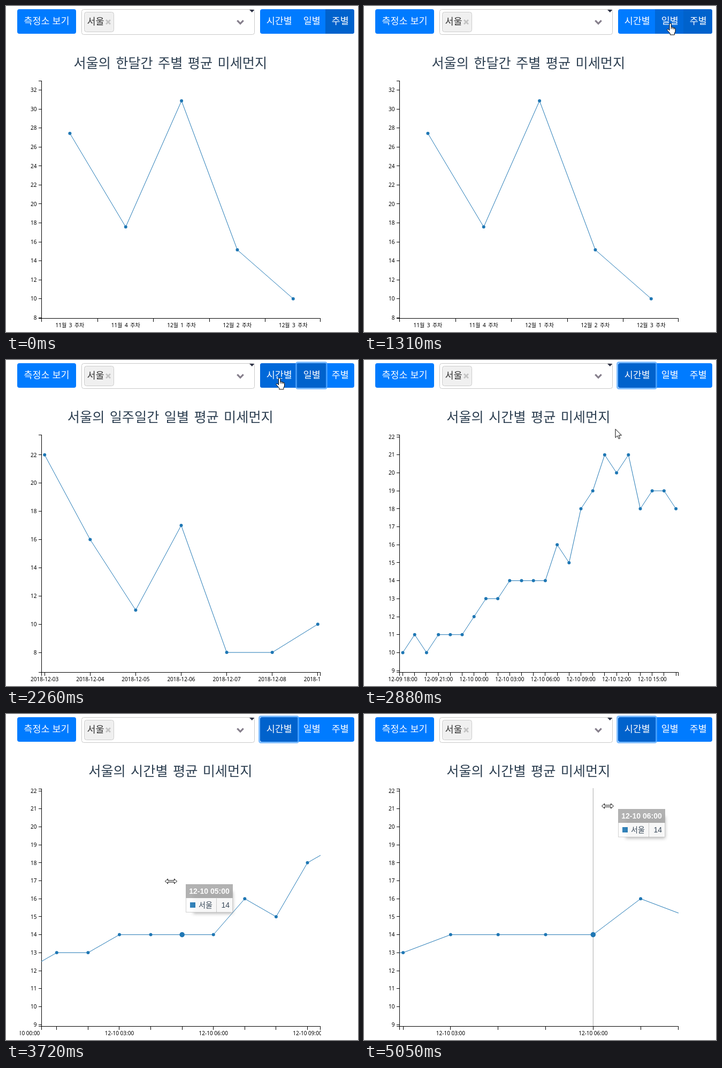
An HTML page for the animation above (5.13 s loop, 658x611 px).

```html
<!DOCTYPE html>
<html lang="ko">
<head>
<meta charset="utf-8">
<style>
  html, body { margin: 0; width: 100%; height: 100%; overflow: hidden; background: #fff; }
  svg { display: block; }
  text { font-family: 'Noto Sans CJK KR', 'Noto Sans CJK', 'Noto Sans', sans-serif; }
  .title { font-size: 25.2px; font-weight: 300; word-spacing: 2.3px; fill: #2c3e50; text-anchor: middle; }
  .ui { font-size: 17.4px; text-anchor: middle; fill: #fff; }
  .axis text { font: 10px 'Noto Sans', 'Noto Sans CJK KR', sans-serif; text-anchor: middle; }
  .axis .y { text-anchor: end; }
  .axis .week { word-spacing: 1.9px; }
  .axis path { fill: none; stroke: #000; shape-rendering: crispEdges; }
  .data { fill: #1f77b4; }
  .data path { fill: none; stroke: #1f77b4; }
  .tip text { font: 14px 'Liberation Sans', 'Noto Sans CJK KR', sans-serif; fill: #2c3e50; }
  .tip .head { font-weight: bold; fill: #fff; text-anchor: middle; }
  .cursor { fill: #fff; stroke: #000; stroke-linejoin: round; }
</style>
</head>
<body>
<svg width="658" height="611" viewBox="0 0 658 611">
  <defs>
    <clipPath id="plot"><rect x="66" y="136" width="522" height="452"/></clipPath>
    <clipPath id="labels"><rect x="26" y="580" width="563" height="31"/></clipPath>
    <clipPath id="group"><rect x="475" y="6" width="176" height="46" rx="4"/></clipPath>
    <filter id="blur" x="-50%" y="-50%" width="200%" height="200%"><feGaussianBlur stdDeviation="3"/></filter>
  </defs>
  <rect x="21" y="6" width="110" height="46" rx="4" fill="#007bff"/>
  <text class="ui" x="76" y="34.3">측정소 보기</text>
  <rect x="141.5" y="6.5" width="323" height="47" rx="4" fill="#fff" stroke="#c8c8c8"/>
  <rect x="146.5" y="11.5" width="55" height="37" rx="4" fill="#f0f0f0" stroke="#ccc"/>
  <text class="ui" x="167.5" y="35.3" style="fill:#333">서울</text>
  <path d="M187 26l8 8m0-8l-8 8" stroke="#c3c3c3" stroke-width="2.8"/>
  <path d="M432.3 27.2l5.7 5.8 5.7-5.8" fill="none" stroke="#857e8b" stroke-width="3.2"/>
  <path d="M455 7h9.5l-4.7 5z" fill="#303548"/>
  <g id="scene"></g>
</svg>
<script>
const LOOP = 5130;
const scene = document.getElementById('scene');
const LEFT = 66.5, RIGHT = 587.5, TOP = 140.5, BOTTOM = 585.5;
const ZOOM_X = 309.1;

const pad = n => String(n).padStart(2, '0');
const hourLabel = i => `12-${i < 6 ? '09' : '10'} ${pad((18 + i) % 24)}:00`;
const range = (from, to, step) =>
  Array.from({ length: Math.floor((to - from) / step) + 1 }, (_, i) => from + i * step);

// x0/dx place the points; top is the y of value `max`, unit is pixels per value
const charts = {
  week: {
    title: '서울의 한달간 주별 평균 미세먼지',
    values: [27.44, 17.57, 30.87, 15.15, 10],
    x0: 119.4, dx: 104.35, max: 32, top: 157.7, unit: 17.77, yTicks: range(8, 32, 2),
    label: i => ['11월 3', '11월 4', '12월 1', '12월 2', '12월 3'][i] + ' 주차', tickShift: 0.5
  },
  day: {
    title: '서울의 일주일간 일별 평균 미세먼지',
    values: [22, 16, 11, 17, 8, 8, 10],
    x0: 72.2, dx: 85.1, max: 22, top: 177.8, unit: 26.45, yTicks: range(8, 22, 2),
    label: i => '2018-12-' + pad(3 + i), tickShift: 0
  },
  hour: {
    title: '서울의 시간별 평균 미세먼지',
    values: [10, 11, 10, 11, 11, 11, 12, 13, 13, 14, 14, 14, 14, 16, 15, 18, 19, 21, 20, 21, 18, 19, 19, 18],
    x0: 72.5, dx: 22.2, max: 22, top: 144.1, unit: 33.69, yTicks: range(9, 22, 1),
    label: i => i % 3 ? '' : hourLabel(i), tickShift: 0
  }
};

// time, cursor, x, y, optional tooltip offset
const pointer = [
  [0], [70, 'arrow', 645, 402], [150, 'arrow', 641, 210], [220, 'hand', 634, 7], [300],
  [620, 'hand', 594, 4], [700, 'hand', 591, 18], [770, 'hand', 587, 27],
  [920, 'hand', 575, 30], [1000, 'hand', 566, 32],
  [1860, 'hand', 560, 31], [1930, 'hand', 554, 32],
  [2100, 'hand', 540, 32], [2180, 'hand', 520, 32], [2260, 'hand', 504.5, 33],
  [2640, 'hand', 502, 36], [2720, 'arrow', 494, 60], [2800, 'arrow', 482, 95], [2880, 'arrow', 469.5, 129],
  [2950, 'resize', 445, 170], [3030, 'resize', 412, 225], [3120, 'resize', 385, 270],
  [3180, 'resize', 365.5, 298.5, 16, 4], [3260, 'resize', 330, 307], [3340, 'resize', 308.5, 313.5, 28, 6],
  [4880, 'resize', 350, 275], [4960, 'resize', 405, 222], [5050, 'resize', 455.5, 172.5]
];
const notches = [[0, 0], [3340, 1], [3410, 2], [3490, 4], [3570, 5], [3650, 6], [3720, 7], [4270, 9], [4350, 10]];

const cursors = {
  arrow: '<path d="M.5.5v16l3.7-3.5 2.6 5.8 2.4-1.1-2.5-5.6h5.2z"/>',
  hand: `<path d="M5 13V2.2a1.7 1.7 0 0 1 3.4 0v5.6q1.6-.9 2.8.6 1.4-.7 2.4.8 2.4-.4 2.4 1.9v5l-1.6 3v2.9H6.2v-2.6L1 13.6q-1-1.7.4-2.3 1.5-.5 3.6 2.3z"/>
    <path d="M8.4 7.8v3.4m2.8-2.6v2.8m2.4-2v2.4" fill="none"/>`,
  resize: '<path d="M-11 0l5-4.5v3H6v-3L11 0 6 4.5v-3H-6v3z"/>'
};

const at = (steps, t) => steps.filter(s => s[0] <= t).pop();
const ramp = (t, from, to) => Math.min(1, Math.max(0, (t - from) / (to - from)));
const snap = v => Math.floor(v) + 0.5;

function drawButtons(t) {
  const dayClick = ramp(t, 1390, 1540), hourClick = ramp(t, 2490, 2680);
  const buttons = [
    { name: '시간별', x: 475, w: 70, dark: 0.75 * ramp(t, 2150, 2250) + 0.25 * hourClick, ring: hourClick },
    { name: '일별', x: 544, w: 54, dark: 0.75 * ramp(t, 590, 740) + 0.25 * dayClick - hourClick, ring: dayClick - hourClick },
    { name: '주별', x: 597, w: 54, dark: 1 - dayClick, ring: 0 }
  ];
  const fills = buttons.map(b =>
    `<rect x="${b.x}" y="6" width="${b.w}" height="46" fill="#0062cc" opacity="${b.dark}"/>`).join('');
  const rings = buttons.map(b =>
    `<rect x="${b.x - 1.5}" y="4.5" width="${b.w + 3}" height="49" rx="3" fill="none" stroke="#55a7ff" stroke-width="3" opacity="${0.75 * b.ring}"/>`).join('');
  const names = buttons.map(b =>
    `<text class="ui" x="${b.x + b.w / 2 + 0.8}" y="34.3">${b.name}</text>`).join('');
  return `<g clip-path="url(#group)"><rect x="475" y="6" width="176" height="46" fill="#007bff"/>${fills}</g>${rings}${names}`;
}

function drawAxes(chart, xOf, yOf) {
  let lines = `M${LEFT - 6} ${TOP}H${LEFT}V${BOTTOM}H${LEFT - 6}M${LEFT} ${BOTTOM + 6}V${BOTTOM}H${RIGHT}V${BOTTOM + 6}`;
  let xText = '', yText = '';
  chart.values.forEach((_, i) => {
    const tick = xOf(i + chart.tickShift);
    if (tick > LEFT && tick < RIGHT) lines += `M${snap(tick)} ${BOTTOM}v6`;
    xText += `<text class="${chart.tickShift ? 'week' : ''}" x="${xOf(i)}" y="602">${chart.label(i)}</text>`;
  });
  for (const v of chart.yTicks) {
    lines += `M${LEFT} ${snap(yOf(v))}h-6`;
    yText += `<text class="y" x="57.5" y="${yOf(v) + 3.7}">${v}</text>`;
  }
  return `<g class="axis"><path d="${lines}"/>${yText}<g clip-path="url(#labels)">${xText}</g></g>`;
}

function drawTooltip(x, y, index) {
  return `<g class="tip" transform="translate(${Math.round(x)} ${Math.round(y)})">
    <rect x="14" y="14" width="74" height="41" fill="#777" opacity=".55" filter="url(#blur)"/>
    <g opacity=".9"><rect x=".5" y=".5" width="87" height="52" fill="#fff" stroke="#ccc"/>
    <rect width="88" height="26" fill="#aaa"/>
    <rect x="8" y="34" width="10" height="10" fill="#1f77b4"/>
    <path d="M57.5 27v25" stroke="#999" stroke-dasharray="1 1"/>
    <text class="head" x="44" y="18">${hourLabel(index)}</text>
    <text x="24" y="44">서울</text><text x="66.5" y="44">${charts.hour.values[index]}</text></g></g>`;
}

function drawScene(t) {
  const chart = t < 1390 ? charts.week : t < 2490 ? charts.day : charts.hour;
  const fade = t < 1390 ? 1 : t < 2490 ? ramp(t, 1340, 1540) : ramp(t, 2430, 2720);
  const scale = 2 ** (at(notches, t)[1] / 5);
  const xOf = i => ZOOM_X + (chart.x0 + chart.dx * i - ZOOM_X) * scale;
  const yOf = v => chart.top + (chart.max - v) * chart.unit;
  const [, kind, x, y, tipX = 20, tipY = 6] = at(pointer, t);

  const hovering = kind === 'resize';
  const focus = hovering ? Math.round((x - xOf(0)) / (chart.dx * scale)) : -1;
  const wheeling = t >= 3340 && t < 4880;
  const guide = hovering && !wheeling
    ? `<path d="M${xOf(focus)} 139V585" stroke="#aaa"/>` : '';

  const points = chart.values.map((v, i) => [xOf(i), yOf(v)]);
  const dots = points.map(([px, py], i) =>
    `<circle cx="${px}" cy="${py}" r="${i === focus ? 4.8 : 3}"/>`).join('');

  return drawButtons(t)
    + `<text class="title" x="307.3" y="115.5">${chart.title}</text>`
    + guide
    + drawAxes(chart, xOf, yOf)
    + `<g class="data" clip-path="url(#plot)" opacity="${fade}"><path d="M${points.join('L')}"/>${dots}</g>`
    + (hovering ? drawTooltip(x + tipX - 0.5, y + tipY - 0.5, focus) : '')
    + (kind ? `<g class="cursor" transform="translate(${x} ${y})">${cursors[kind]}</g>` : '');
}

const start = performance.now();
function frame() {
  scene.innerHTML = drawScene((performance.now() - start) % LOOP);
  requestAnimationFrame(frame);
}
frame();
</script>
</body>
</html>
```
